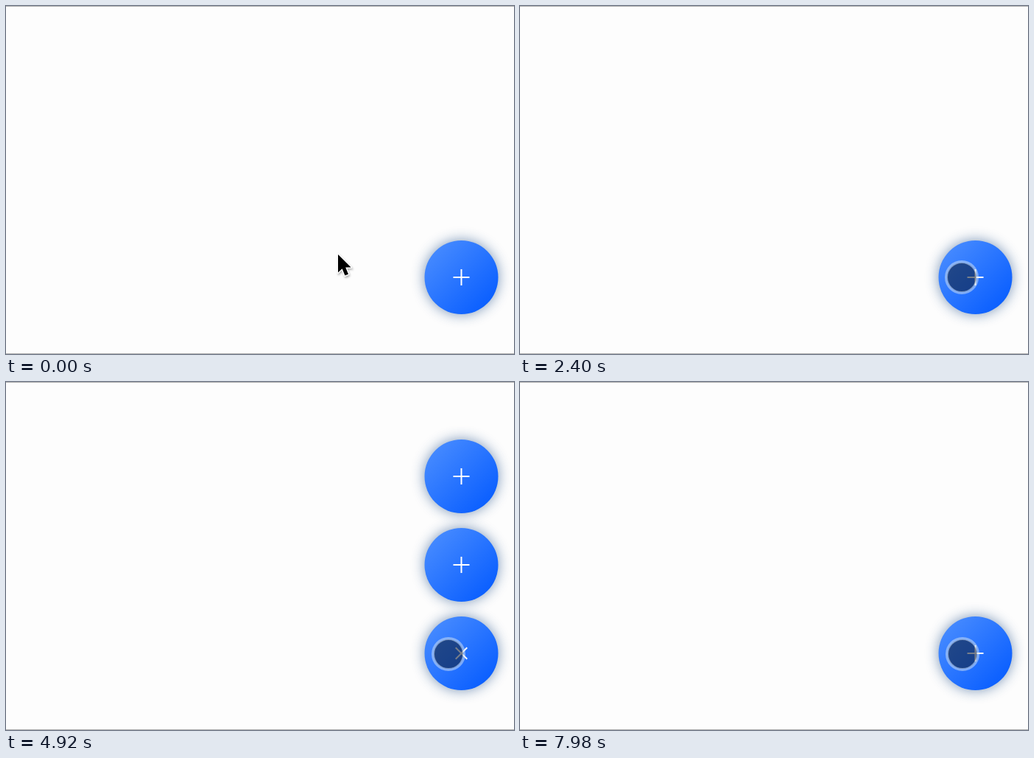
Animation of 690x472 px, one loop 8 s. Source, as an HTML page:

```html
<!DOCTYPE html>
<html lang="en">
<head>
<meta charset="utf-8">
<title>Floating action button</title>
<style>
  html, body { margin: 0; width: 100%; height: 100%; overflow: hidden; background: #fdfdfd; }
  svg { display: block; width: 690px; height: 472px; }
</style>
</head>
<body>
<svg viewBox="0 0 690 472">
  <defs>
    <linearGradient id="blue" x1=".15" y1=".15" x2=".85" y2=".85">
      <stop offset="0" stop-color="#4388ff"/>
      <stop offset="1" stop-color="#0c60ff"/>
    </linearGradient>
    <filter id="blur" x="-60%" y="-60%" width="220%" height="220%" color-interpolation-filters="sRGB">
      <feGaussianBlur stdDeviation="9"/>
    </filter>
    <filter id="soft" x="-50%" y="-50%" width="200%" height="200%">
      <feGaussianBlur stdDeviation="1.8"/>
    </filter>
    <path id="plus" d="M-11 0H11M0 -11V11" stroke="#fff" stroke-width="2"/>
    <path id="pointer" d="M0 0V24.5L5.6 19.2L9.4 28.6L14 26.7L10.2 17.5H17.6Z"/>
  </defs>
  <rect width="690" height="472" fill="#fdfdfd"/>
  <g id="buttons"></g>
  <g id="arrow">
    <use href="#pointer" x="1" y="2" stroke="#000" stroke-width="2" opacity=".35" filter="url(#soft)"/>
    <use href="#pointer" stroke="#fff" stroke-width="3" stroke-linejoin="round"/>
    <use href="#pointer"/>
  </g>
  <g id="touch">
    <circle r="20" fill="#0e192e" fill-opacity=".56"/>
    <circle r="21" fill="none" stroke="#d8e6f2" stroke-opacity=".5" stroke-width="4"/>
  </g>
  <path d="M0 .5H690M0 471.5H690" stroke="#b0b0b0"/>
</svg>
<script>
const LOOP = 8000, OPEN = 2970, CLOSE = 6289;
const MOVE_MS = 500, ICON_MS = 150;
const HOME = { x: 618.5, y: 368 };
const $ = id => document.getElementById(id);
const clamp = v => Math.min(1, Math.max(0, v));

// Pointer path: time, x, y
const path = [
  [1020, 451, 337], [1300, 540, 348], [1540, 612, 391], [1900, 568, 344],
  [2250, 600, 368], [3300, 600, 368], [3700, 601, 369]
];

function makeButton() {
  const g = document.createElementNS('http://www.w3.org/2000/svg', 'g');
  g.innerHTML = `<circle r="50" fill="#1c4a86" filter="url(#blur)"/>
    <circle r="50" fill="url(#blue)"/><use href="#plus"/>`;
  $('buttons').append(g);
  return { g, shadow: g.children[0], icon: g.children[2] };
}

// CSS "ease": cubic-bezier(.25, .1, .25, 1)
function ease(x) {
  x = clamp(x);
  let lo = 0, hi = 1, u = x;
  const curve = (a, b) => 3 * a * u * (1 - u) ** 2 + 3 * b * u * u * (1 - u) + u ** 3;
  for (let i = 0; i < 22; i++) {
    u = (lo + hi) / 2;
    if (curve(.25, .25) < x) lo = u; else hi = u;
  }
  return curve(.1, 1);
}

const opened = (t, ms) => ease((t - OPEN) / ms) - ease((t - CLOSE) / ms);

function pointerAt(t) {
  let at = path[0].slice(1);
  for (let i = 1; i < path.length; i++) {
    const [t0, ...from] = path[i - 1], [t1, ...to] = path[i];
    if (t < t0) break;
    const k = clamp((t - t0) / (t1 - t0)), s = k * k * (3 - 2 * k);
    at = from.map((v, j) => v + (to[j] - v) * s);
  }
  return at;
}

function place(button, lift, scale, shade) {
  button.g.setAttribute('transform', `translate(${HOME.x} ${HOME.y - lift}) scale(${scale})`);
  button.shadow.setAttribute('opacity', shade);
}

const [lower, upper, main] = [makeButton(), makeButton(), makeButton()];
place(main, 0, 1, .6);

function draw(t) {
  const p = opened(t, MOVE_MS);
  place(lower, 120 * p, .75 + .25 * p, .2 + .4 * p);
  place(upper, 240 * p, .75 + .25 * p, .2 + .4 * p);
  main.icon.setAttribute('transform', `rotate(${45 * opened(t, ICON_MS)})`);

  const touching = t > path[0][0] + 60;
  const at = `translate(${pointerAt(t)})`;
  $('arrow').setAttribute('transform', at);
  $('touch').setAttribute('transform', at);
  $('arrow').setAttribute('display', touching ? 'none' : 'inline');
  $('touch').setAttribute('display', touching ? 'inline' : 'none');
}

let start;
function tick(now) {
  start ??= now;
  draw((now - start) % LOOP);
  requestAnimationFrame(tick);
}
draw(0);
requestAnimationFrame(tick);
</script>
</body>
</html>
```
